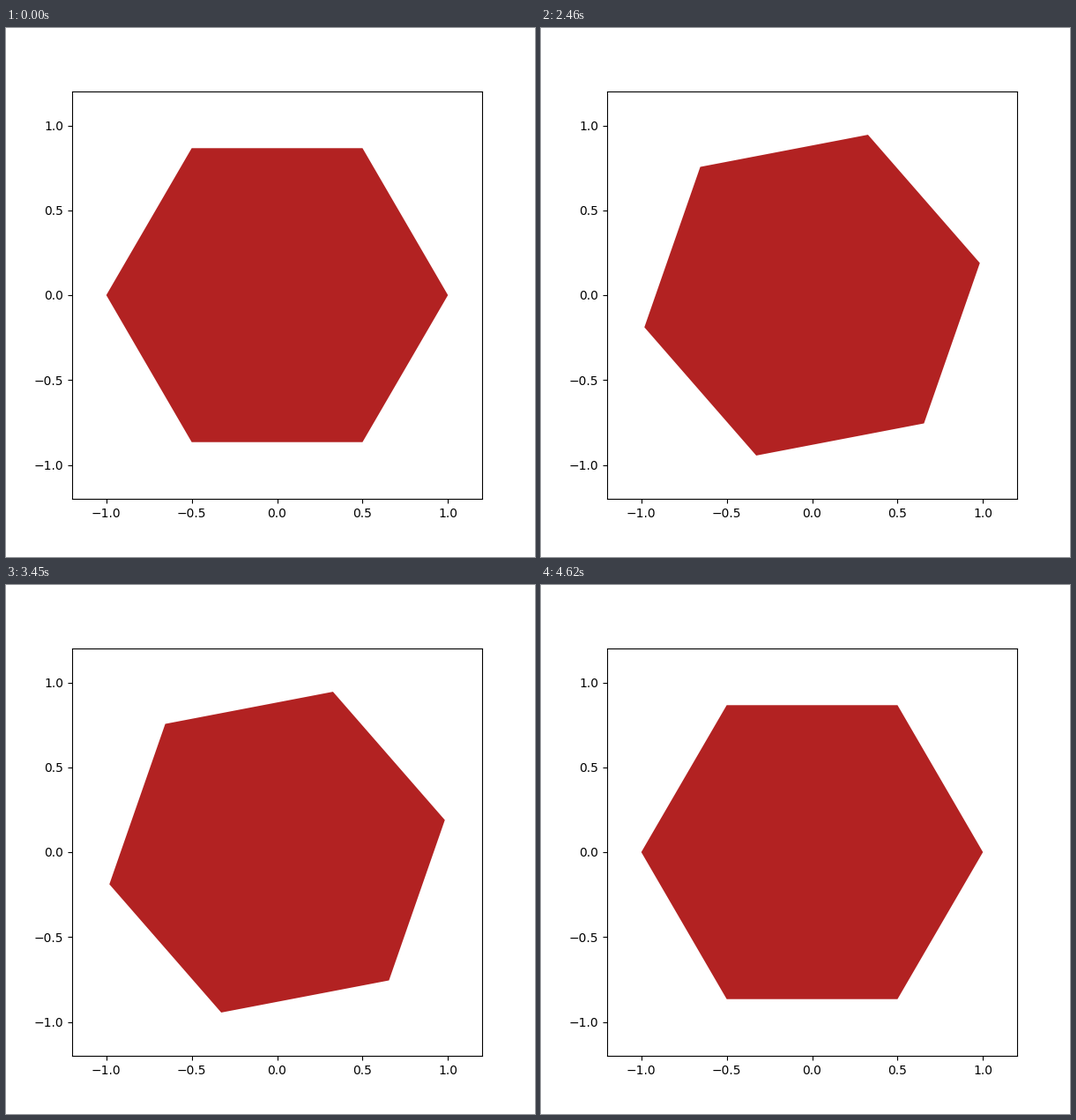
A matplotlib script for the animation above (6300 ms loop, 600 by 600 pixels).

```python
import matplotlib.pyplot as plt
import numpy as np
from matplotlib.animation import FuncAnimation
from matplotlib.patches import Polygon

FRAMES, INTERVAL = 210, 30
HOLD = 55           # still frames before the turn starts
TURN_STEPS = 99     # steps of the clockwise half turn
CORNERS = np.arange(6) * np.pi / 3


def hexagon(turn):
    angles = CORNERS - turn
    return np.column_stack([np.cos(angles), np.sin(angles)])


fig, ax = plt.subplots(figsize=(6, 6), dpi=100)
ax.set_xlim(-1.2, 1.2)
ax.set_ylim(-1.2, 1.2)
shape = ax.add_patch(Polygon(hexagon(0), facecolor="firebrick", edgecolor="none"))


def update(frame):
    step = min(max(frame - HOLD, 0), TURN_STEPS)
    shape.set_xy(hexagon(np.pi * step / TURN_STEPS))
    return (shape,)


anim = FuncAnimation(fig, update, frames=FRAMES, interval=INTERVAL,
                     repeat=True, repeat_delay=0)
plt.show()
```
